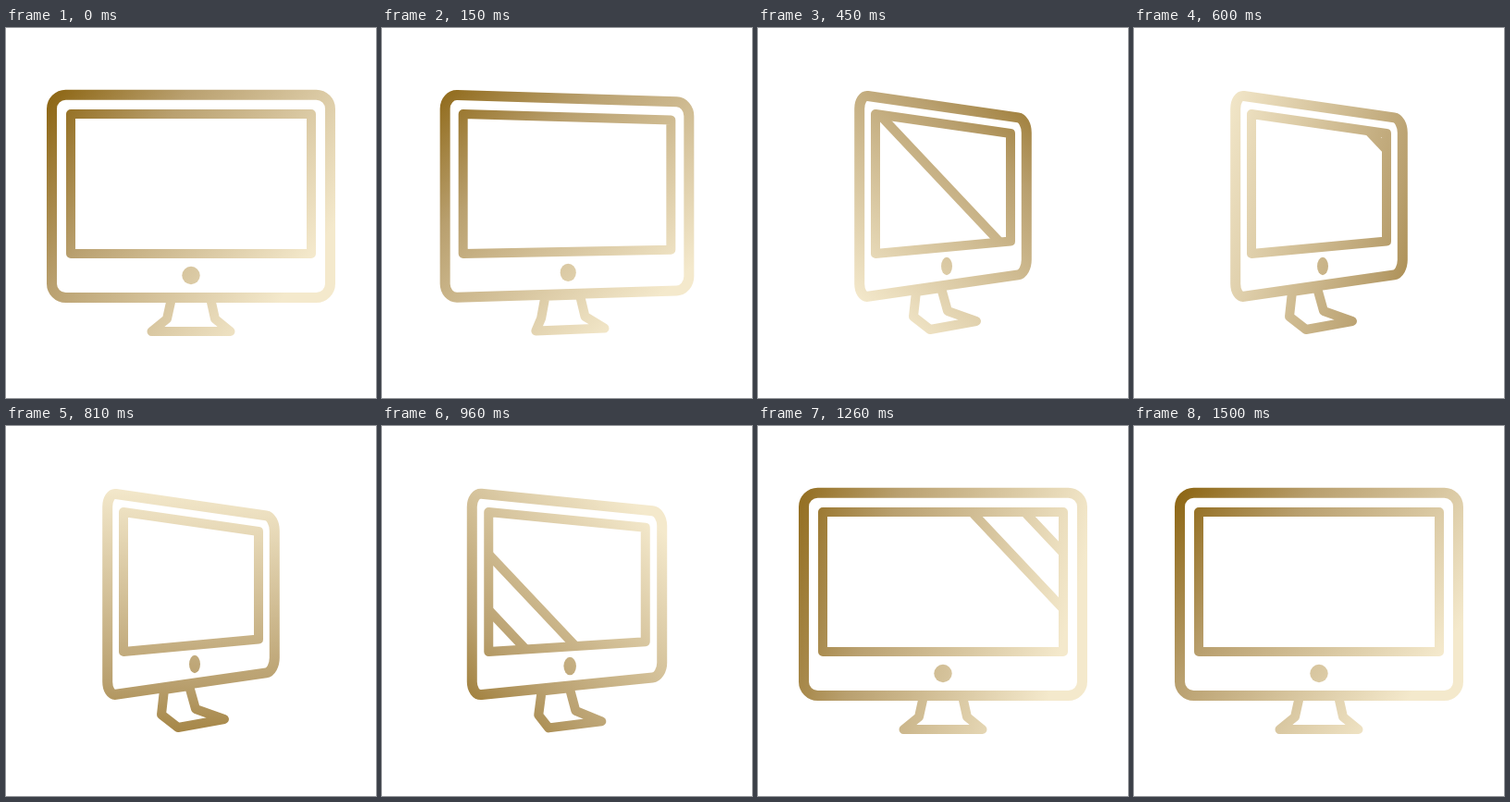
Recreate the animation shown at these times as an HTML page. Size 400 px wide and 400 px high, loop 3620 ms.

```html
<!DOCTYPE html>
<html lang="en">
<head>
<meta charset="utf-8">
<title>Turning monitor</title>
<style>
  html, body { margin: 0; width: 100%; height: 100%; overflow: hidden; background: #fff; }
  svg { display: block; width: 100vw; height: 100vh; }
</style>
</head>
<body>
<svg viewBox="0 0 400 400">
  <defs>
    <linearGradient id="gold" gradientUnits="userSpaceOnUse">
      <stop offset="0" stop-color="#8d6614"/>
      <stop offset=".36" stop-color="#b9a06f"/>
      <stop offset="1" stop-color="#f4e9cc"/>
    </linearGradient>
    <clipPath id="glass"><path id="pane"/></clipPath>
  </defs>
  <g fill="none" stroke="url(#gold)" stroke-width="10" stroke-linejoin="round">
    <g clip-path="url(#glass)">
      <path id="shine"/>
    </g>
    <path id="stand"/>
    <path id="body" stroke-width="11"/>
    <path id="screen"/>
    <ellipse id="dot" fill="url(#gold)" stroke="none"/>
  </g>
</svg>
<script>
const LOOP = 3620, STEP = 30, END = 1500, HALF = 640;
const $ = id => document.getElementById(id);
const set = (id, attrs) =>
  Object.entries(attrs).forEach(([k, v]) => $(id).setAttribute(k, v));

const mix = (a, b, p) => a + (b - a) * p;
const ease = (t, from, to) => {
  const u = Math.min(1, Math.max(0, (t - from) / (to - from)));
  return u * u * (3 - 2 * u);
};
const poly = pts => 'M' + pts.map(p => p.join(' ')).join('L') + 'Z';

// Panel centred on x = 200 whose right side shrinks as it turns
const panel = (half, top, bottom, drop, rise) => [
  [200 - half, top], [200 + half, top + drop],
  [200 + half, bottom - rise], [200 - half, bottom]
];

// Corners cut back by rx along the flat edges and ry along the upright ones
function rounded(pts, rx, ry) {
  const d = pts.map((p, i) => {
    const cut = q => {
      const r = q[0] === p[0] ? ry / Math.abs(q[1] - p[1]) : rx / Math.abs(q[0] - p[0]);
      return p.map((v, k) => mix(v, q[k], r));
    };
    const a = cut(pts[(i + 3) % 4]), b = cut(pts[(i + 1) % 4]);
    const pull = e => e.map((v, k) => mix(v, p[k], .55)).join(' ');
    return `${a.join(' ')}C${pull(a)} ${pull(b)} ${b.join(' ')}`;
  });
  return 'M' + d.join('L') + 'Z';
}

// Left half of the stand, mirrored; then how far each point moves when turned
const leg = [[179, 292], [174, 314.5], [157.5, 328]];
const foot = [...leg, ...leg.map(([x, y]) => [400 - x, y]).reverse()];
const sway = [[-8, -7], [-6, -2.5], [28.5, -2], [-6.5, -11], [-21, -8.5], [-23, -11]];

// x where a streak meets the top of the screen
const firstPass = t => 51 + .704 * (t - 330);
const secondPass = t => 174 + .749 * (t - 1080) - .00049 * (t - 1080) ** 2;
const streak = x => `M${x - 50} 45L${x + 150} 257`;

function shine(t) {
  if (t < 150 || t >= END) return '';
  if (t < 720) return streak(firstPass(t));
  const x = secondPass(t);
  return streak(x) + streak(x - 57);
}

// One full turn: quick start, long slow finish
const spin = t => 35 + (t < HALF
  ? 180 * (t / HALF) ** 1.8
  : 360 - 180 * ((END - t) / (END - HALF)) ** 1.7);

function draw(t) {
  const p = ease(t, 0, 405) - ease(t, 849, 1229);

  const half = mix(150.5, 90.3, p);
  const body = panel(half, 72.2, 291.6, 26 * p, 26 * p);
  set('body', { d: rounded(body, half / 10, 15) });

  const screen = poly(panel(mix(130, 73, p), 93, 244, 21 * p, 13.5 * p));
  set('screen', { d: screen });
  set('pane', { d: screen });
  set('shine', { d: shine(t) });

  set('stand', { d: poly(foot.map(([x, y], i) => [x + sway[i][0] * p, y + sway[i][1] * p])) });
  set('dot', { cx: 200 + 4 * p, cy: 267.5 - 10 * p, rx: 9.7 - 3.7 * p, ry: 9.7 });

  const a = spin(t) * Math.PI / 180, c = Math.cos(a), s = Math.sin(a);
  set('gold', { x1: 200 - 198 * c, y1: 200 - 198 * s, x2: 200 + 134 * c, y2: 200 + 134 * s });
}

const start = performance.now();
function tick() {
  const t = Math.max(0, performance.now() - start) % LOOP;
  draw(Math.min(END, Math.floor(t / STEP) * STEP));
  requestAnimationFrame(tick);
}
tick();
</script>
</body>
</html>
```
